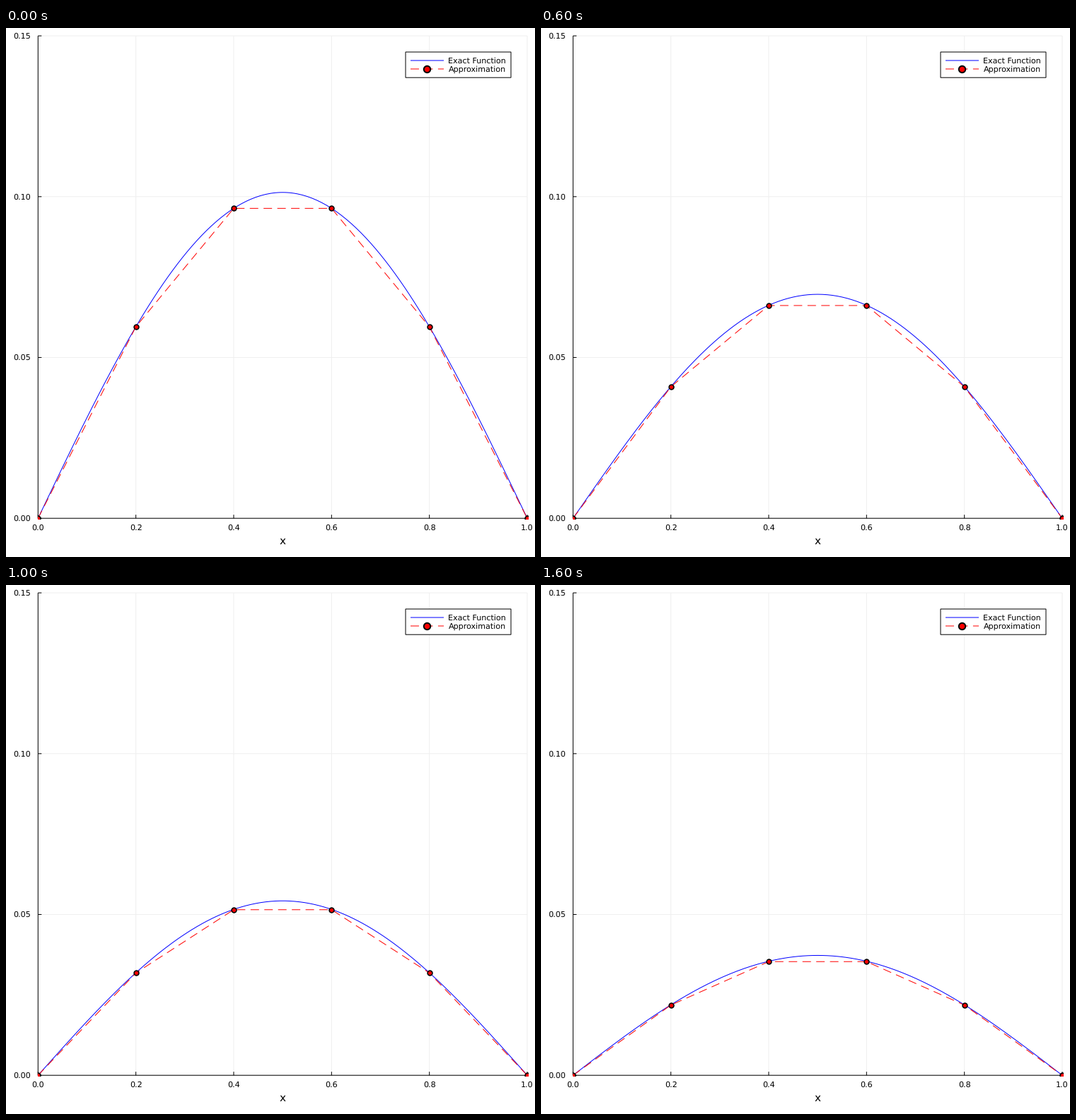
Animation of 748 by 749 pixels, one loop 1.8 s. Source, as a matplotlib script:

```python
import numpy as np
import matplotlib.pyplot as plt
from matplotlib.animation import FuncAnimation
from matplotlib.patches import Rectangle

W, H, DPI = 748, 749, 100
LEFT, RIGHT, TOP, BOTTOM = 45.3, 737.0, 11.1, 694.2
Y_MAX = 0.15
FRAMES, INTERVAL = 9, 200
PX = 72 / DPI  # points per pixel
UNIT = W / 500
DASH = (8 * UNIT, 5 * UNIT)

plt.rcParams["font.family"] = "DejaVu Sans"
plt.rcParams["text.hinting"] = "none"
fig = plt.figure(figsize=(W / DPI, H / DPI), dpi=DPI, facecolor="white")
ax = fig.add_axes([0, 0, 1, 1])
ax.set_xlim(0, W)
ax.set_ylim(H, 0)
ax.axis("off")


def to_x(x):
    return LEFT + (RIGHT - LEFT) * np.asarray(x)


def to_y(y):
    return BOTTOM - (BOTTOM - TOP) * np.asarray(y) / Y_MAX


def line(xs, ys, color, width=1.0, **kw):
    return ax.plot(xs, ys, color=color, lw=width * PX, snap=False,
                   solid_capstyle="butt", dash_capstyle="butt", **kw)[0]


def dashed(xs, ys, z):
    item = line(xs, ys, "red", zorder=z)
    item.set_dashes(DASH)
    return item


def dots(xs, ys, size, edge, z):
    return ax.plot(xs, ys, "o", ms=size * PX, mfc="red", mec="black",
                   mew=edge * PX, snap=False, zorder=z)[0]


def label(x, y, text, size=8, ha="center"):
    ax.text(x, y, text, fontsize=size, ha=ha, va="baseline", zorder=8)


# Grid, ticks and axes
for v in np.linspace(0, 1, 6):
    x = to_x(v)
    line([x, x], [TOP, BOTTOM], "#efefef", zorder=1)
    line([x, x], [BOTTOM - 5, BOTTOM], "black", zorder=3)
    label(x, 711, f"{v:.1f}")
for v in np.linspace(0, Y_MAX, 4):
    y = to_y(v)
    line([LEFT, RIGHT], [y, y], "#efefef", zorder=1)
    line([LEFT, LEFT + 5], [y, y], "black", zorder=3)
    label(35.3, y + 3.8, f"{v:.2f}", ha="right")
line([LEFT, LEFT], [TOP, BOTTOM + 0.5], "black", zorder=3)
line([LEFT, RIGHT], [BOTTOM, BOTTOM], "black", zorder=3)
label((LEFT + RIGHT) / 2, 731, "x", size=11)

# Legend
ax.add_patch(Rectangle((565, 34), 149, 36.2, fc="white", ec="black",
                       lw=PX, snap=False, zorder=6))
line([572, 619], [46, 46], "blue", zorder=7)
dashed([572, 619], [58, 58], 7)
dots([595.5], [58], 9.4, 2, 8)
label(625.3, 50, "Exact Function", ha="left")
label(626, 62, "Approximation", ha="left")

# Moving curves
grid = np.linspace(0, 1, 201)
nodes = np.linspace(0, 1, 6)
exact = line(to_x(grid), to_y(0 * grid), "blue", zorder=4)
approx = dashed(to_x(nodes), to_y(0 * nodes), 4.5)
marks = dots(to_x(nodes), to_y(0 * nodes), 6.8, 1.6, 5)
area = Rectangle((LEFT - 0.3, TOP), RIGHT - LEFT + 1, BOTTOM - TOP + 0.8,
                 transform=ax.transData)
for item in (exact, approx, marks):
    item.set_clip_path(area)


def heat(x, t, rate=1.0):
    return np.sin(np.pi * x) / np.pi**2 * np.exp(-rate * t)


def update(i):
    t = i / (FRAMES - 1)
    exact.set_ydata(to_y(heat(grid, t)))
    values = to_y(heat(nodes, t, 1.003))
    approx.set_ydata(values)
    marks.set_ydata(values)
    return exact, approx, marks


anim = FuncAnimation(fig, update, frames=FRAMES, interval=INTERVAL,
                     repeat=True, repeat_delay=0)
plt.show()
```
